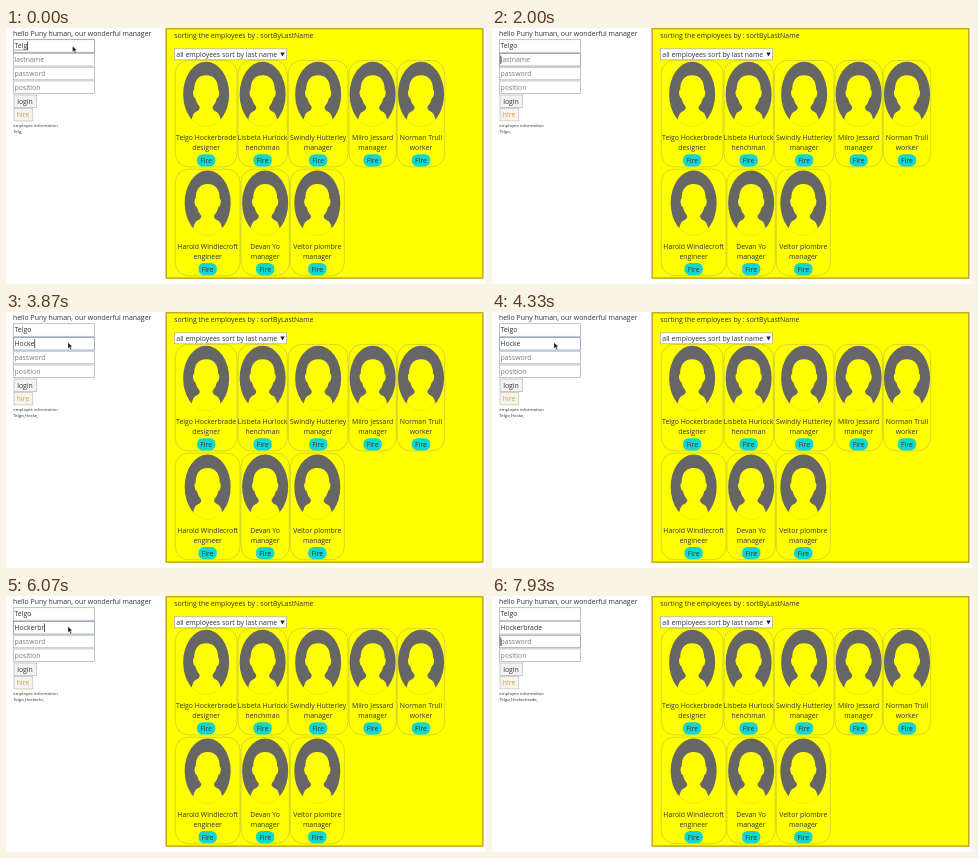
An HTML page for the animation above (8 s loop, 480 px wide and 256 px high).

```html
<!DOCTYPE html>
<html lang="en">
<head>
<meta charset="utf-8">
<title>Employee manager</title>
<style>
  html, body { margin: 0; width: 100%; height: 100%; overflow: hidden; background: #fefefe; }
  svg { display: block; width: 100vw; height: 100vh; }
  text { font: 6.9px "Open Sans", "Noto Sans", sans-serif; fill: #303336; white-space: pre; }
  .tiny { font-size: 4.3px; }
  .mid { text-anchor: middle; }
</style>
</head>
<body>
<svg id="stage" viewBox="0 0 480 256">
  <defs>
    <g id="avatar">
      <ellipse cy="32.500" rx="23" ry="32.500" fill="#666"/>
      <path d="M0 13.500C8 13.500 12 19 12 28Q13.500 28.500 13 32.500Q12.500 36 10.800 36.500Q9.500 42 6.500 45V47Q7.500 49 11 50.500Q14.500 52.500 15.500 66H-15.500Q-14.500 52.500 -11 50.500Q-7.500 49 -6.500 47V45Q-9.500 42 -10.800 36.500Q-12.500 36 -13 32.500Q-13.500 28.500 -12 28C-12 19 -8 13.500 0 13.500Z" fill="#ff0"/>
      <path d="M-15 57.100A23 32.500 0 0 0 15 57.100" fill="none" stroke="#dcdc30" stroke-width="0.5"/>
    </g>
  </defs>
</svg>
<script>
const LOOP = 8000;
const FIRST = "Telgo", LAST = "Hockerbrade";
const stage = document.getElementById("stage");

function add(tag, attrs, content) {
  const el = document.createElementNS("http://www.w3.org/2000/svg", tag);
  for (const key in attrs) el.setAttribute(key, attrs[key]);
  if (content) el.textContent = content;
  stage.appendChild(el);
  return el;
}
const box = (x, y, width, height, fill, stroke, rx = 0, sw = 0.7) =>
  add("rect", { x, y, width, height, fill, stroke, rx, "stroke-width": sw });
const label = (x, y, content, cls = "", fill = "") =>
  add("text", { x, y, class: cls, style: fill && `fill:${fill}` }, content);

// Employee panel
box(160.2, 0.7, 316.6, 249.4, "#ff0", "#c8aa28", 0, 1.6);
label(168.3, 10, "sorting the employees by : sortByLastName");
box(168.5, 20.8, 112, 11, "#fff", "#aaa");
label(170.3, 28.8, "all employees sort by last name");
add("path", { d: "M274.300 24.500h4.400l-2.200 4z", fill: "#222" });

function card(left, right, top, name, role) {
  const cx = (left + right) / 2;
  box(left, top, right - left, 106.5, "none", "#c4c43c", 13, 0.7);
  add("use", { href: "#avatar", x: cx, y: top + 1.3 });
  label(cx, top + 79.3, name, "mid");
  label(cx, top + 90, role, "mid");
  box(cx - 9.2, top + 93.8, 18.4, 12.2, "#14d6d0", "none", 5.5);
  label(cx, top + 102.4, "Fire", "mid");
}
card(169.3, 231, 32.4, FIRST + " " + LAST, "designer");
card(232, 281.3, 32.4, "Lisbeta Hurlock", "henchman");
card(282.3, 342, 32.4, "Swindly Hutterley", "manager");
card(343, 390.3, 32.4, "Milro Jessard", "manager");
card(391.3, 438.7, 32.4, "Norman Trull", "worker");
card(169.3, 234, 141.2, "Harold Windlecroft", "engineer");
card(235, 283.3, 141.2, "Devan Yo", "manager");
card(284.3, 338.3, 141.2, "Veltor plombre", "manager");

// Form
label(7, 8.4, "hello Puny human, our wonderful manager");
const fields = ["firstname", "lastname", "password", "position"].map((hint, i) => {
  const y = 11.7 + i * 13.75;
  return { hint, y, frame: box(7.6, y, 81, 12.6, "#fff", "#aaa"), text: label(8.5, y + 8.7, "") };
});
box(8, 67, 22.7, 12.4, "#f3f3f3", "#b5b5b5");
label(11.2, 75.5, "login");
box(8, 80.6, 18.8, 12.3, "#f3f3f3", "#c9bfa8");
label(10.8, 89.2, "hire", "", "#e0a02c");
label(7.3, 98.5, "employee information", "tiny");
const info = label(7.3, 105.2, "", "tiny");
const caret = add("path", { stroke: "#111", "stroke-width": 0.7 });
const underline = add("path", { stroke: "#96645a", "stroke-width": 0.6 });
const pointer = add("path", {
  d: "M0 0V5.200L1.300 4.100L2.200 6.200L3.100 5.800L2.200 3.800H3.800Z",
  fill: "#111", stroke: "#fff", "stroke-width": 0.3
});

// Key presses: [time, focused field, first name length, last name length]
const keys = [[-400, 0, 4, 0], [700, 0, 5, 0], [1600, 1, 5, 0]];
[2530, 2800, 3270, 3430, 3600].forEach((t, i) => keys.push([t, 1, 5, i + 1]));
for (let i = 0; i < 6; i++) keys.push([5660 + i * 150, 1, 5, 6 + i]);
keys.push([7600, 2, 5, 11]);

function draw(t) {
  const [since, focus, n, m] = keys.filter(k => k[0] <= t).pop();
  const idle = t - since;
  const values = [FIRST.slice(0, n), LAST.slice(0, m), "", ""];
  fields.forEach((f, i) => {
    f.text.textContent = values[i] || f.hint;
    f.text.style.fill = values[i] ? "" : "#7b7b7b";
    f.frame.setAttribute("stroke", i === focus ? "#6f87b4" : "#aaa");
  });
  info.textContent = values.filter(Boolean).map(v => v + ",").join("");

  const active = fields[focus];
  const width = values[focus] ? active.text.getComputedTextLength() : 0;
  const blink = idle % 1060 < 530;
  caret.setAttribute("d", `M${8.8 + width} ${active.y + 2}v8.600`);
  caret.style.display = blink ? "" : "none";
  // The spelling mark waits for a pause in typing
  underline.setAttribute("d", `M8.500 ${active.y + 10.4}h${width}`);
  underline.style.display = blink && idle >= 400 ? "" : "none";

  const early = t < 700;
  pointer.setAttribute("transform", `translate(${early ? "66.500 18" : "62 30.500"}) scale(1.15)`);
  pointer.style.display = early || (t >= 3700 && t < 7600) ? "" : "none";
}

const start = performance.now();
function tick() {
  draw((performance.now() - start) % LOOP);
  requestAnimationFrame(tick);
}
tick();
</script>
</body>
</html>
```
